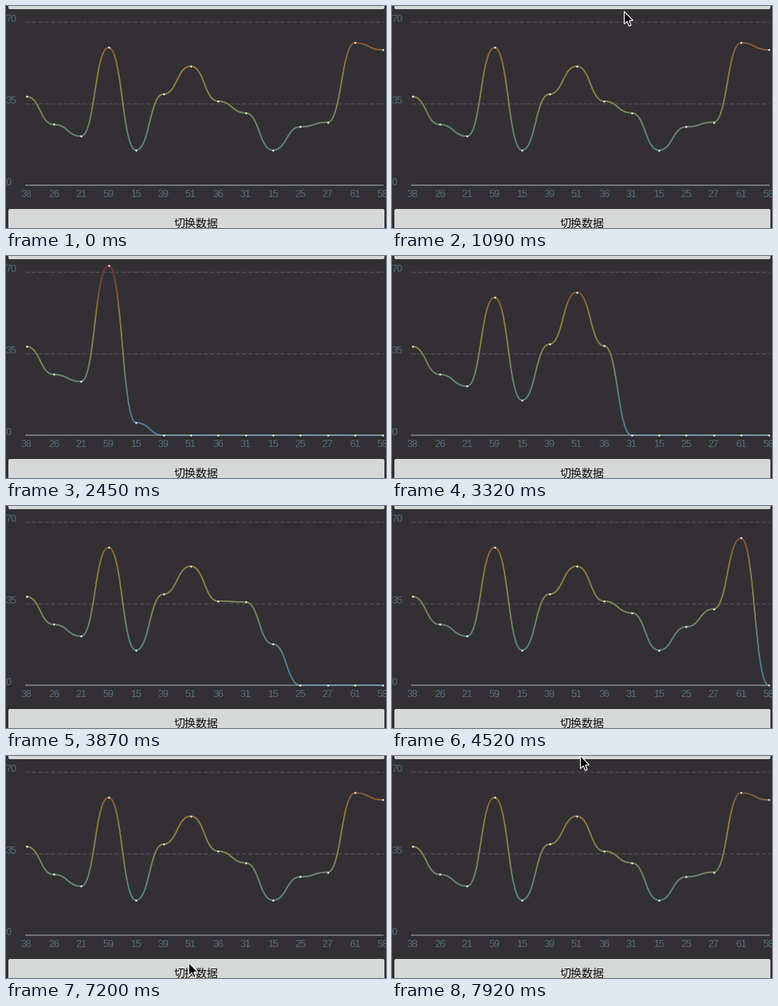
A matplotlib script that plays this animation: 477x280 px, repeating every 8000 ms.

```python
import numpy as np
import matplotlib.pyplot as plt
from matplotlib.animation import FuncAnimation
from matplotlib.collections import LineCollection
from matplotlib.colors import LinearSegmentedColormap
from matplotlib.patches import FancyBboxPatch, Polygon, Rectangle

W, H, DPI = 477, 280, 64
PX = 72 / DPI                      # one pixel in points
LOOP, STEP = 8000, 20

BG, BUTTON, LABEL = "#323033", "#d6d7d7", "#546e7a"
HEAT = ["#733634", "#92773e", "#7c874f", "#5c8280", "#4c789c"]
VALUES = np.array([38, 26, 21, 59, 15, 39, 51, 36, 31, 15, 25, 27, 61, 58])
XS = 25.6 + 34.38 * np.arange(len(VALUES))
BASE, TOP, MAX = 226, 20, 70
VIEW_TOP = 10

# points grow one after another, each with an overshoot
START, STAGGER, DURATION, TENSION = 1438, 242, 670, 3
DELAY = START + STAGGER * np.arange(len(VALUES))

# the chart refreshes in slightly uneven steps between these key times
TICKS = np.interp(np.arange(30), [0, 3, 7, 14, 23, 29],
                  [1490, 1880, 2450, 3320, 4520, 5300])

ARROW = np.array([(0, 0), (0, 16), (3.7, 12.6), (6.2, 18.6), (8.6, 17.6),
                  (6.2, 11.8), (11, 11.4)])


def to_y(value):
    return BASE - value * (BASE - TOP) / MAX


def overshoot(x):
    u = np.clip(x, 0, 1) - 1
    return u * u * ((TENSION + 1) * u + TENSION) + 1


def heights(t):
    if t < TICKS[0]:
        return to_y(VALUES)
    tick = TICKS[TICKS <= t][-1]
    return to_y(VALUES * overshoot((tick - DELAY) / DURATION))


def stepped(t, start, end, steps):
    """Progress from 0 to 1 in equal jumps."""
    return np.clip(np.floor((t - start) / (end - start) * steps) / steps, 0, 1)


def pointer_at(t):
    """Tip of the pointer, or None while it is away."""
    if 580 <= t < 2300:
        s = stepped(t, 580, 1090, 4)
        return 289 + 2 * s, 6 + 120 * (1 - s) ** 2
    if t >= 7200:
        s = stepped(t, 7200, 7920, 5)
        return 229 + 7 * s + 9 * np.sin(np.pi * s), -1 + 261 * (1 - s) ** 3
    return None


S = np.linspace(0, 1, 25)[:-1]
EASE_X = 1.5 * S - 1.5 * S**2 + S**3
EASE_Y = 3 * S**2 - 2 * S**3


def smooth(v, ease):
    """Bezier spans with level tangents at every point."""
    spans = v[:-1, None] + np.diff(v)[:, None] * ease
    return np.append(spans.ravel(), v[-1])


CURVE_X = smooth(XS, EASE_X)

fig = plt.figure(figsize=(W / DPI, H / DPI), dpi=DPI, facecolor=BG)
ax = fig.add_axes([0, 0, 1, 1])
ax.set_xlim(0, W)
ax.set_ylim(H, 0)
ax.axis("off")


def button(y, h):
    ax.add_patch(FancyBboxPatch((5, y + 2), 468, h - 4, lw=0, fc=BUTTON,
                                boxstyle="round,pad=2,rounding_size=2"))


def label(x, y, text, ha):
    ax.text(x, y, text, color=LABEL, ha=ha, va="baseline",
            family="Liberation Sans", size=12.6 * PX)


button(-40, 44)
button(256, 48)
ax.text(239, 279, "切换数据", color="#101010", ha="center", va="baseline",
        family="Noto Sans CJK JP", size=14 * PX)

for value in (0, 35, 70):
    y = to_y(value)
    label(-0.8, y + 0.4, str(value), "left")
    if value:
        ax.plot([24, 474], [y, y], color="#514f53", lw=1.3 * PX,
                dashes=(5 / 1.3, 3 / 1.3), dash_capstyle="butt", zorder=1)
for x, value in zip(XS, VALUES):
    label(x, 241.4, str(value), "center")

view = Rectangle((0, VIEW_TOP), W, H, transform=ax.transData)
curve = LineCollection([], lw=1.8 * PX, capstyle="round", zorder=2,
                       cmap=LinearSegmentedColormap.from_list("heat", HEAT))
curve.set_clim(TOP, BASE)
ax.add_collection(curve, autolim=False)
ax.plot([24, 474], [BASE, BASE], color="#a0a6a6", alpha=0.7, lw=1.6 * PX,
        solid_capstyle="butt", zorder=3)
dots, = ax.plot(XS, to_y(VALUES), "o", color="white", ms=2.3 * PX, mew=0,
                zorder=4)
for artist in (curve, dots):
    artist.set_clip_path(view)

pointer = Polygon(ARROW, closed=True, fc="black", ec="white", lw=1.1 * PX,
                  joinstyle="miter", zorder=5)
ax.add_patch(pointer)


def draw(i):
    t = i * STEP + STEP / 2
    ys = heights(t)
    cy = smooth(ys, EASE_Y)
    pts = np.column_stack([CURVE_X, cy])
    curve.set_segments(np.stack([pts[:-1], pts[1:]], axis=1))
    curve.set_array((cy[:-1] + cy[1:]) / 2)
    dots.set_ydata(ys)

    tip = pointer_at(t)
    pointer.set_visible(tip is not None)
    if tip is not None:
        pointer.set_xy(ARROW + np.round(tip) + (0.5, 0.8))
    return curve, dots, pointer


anim = FuncAnimation(fig, draw, frames=LOOP // STEP, interval=STEP,
                     init_func=lambda: draw(0), repeat=True, repeat_delay=0)
plt.show()
```
